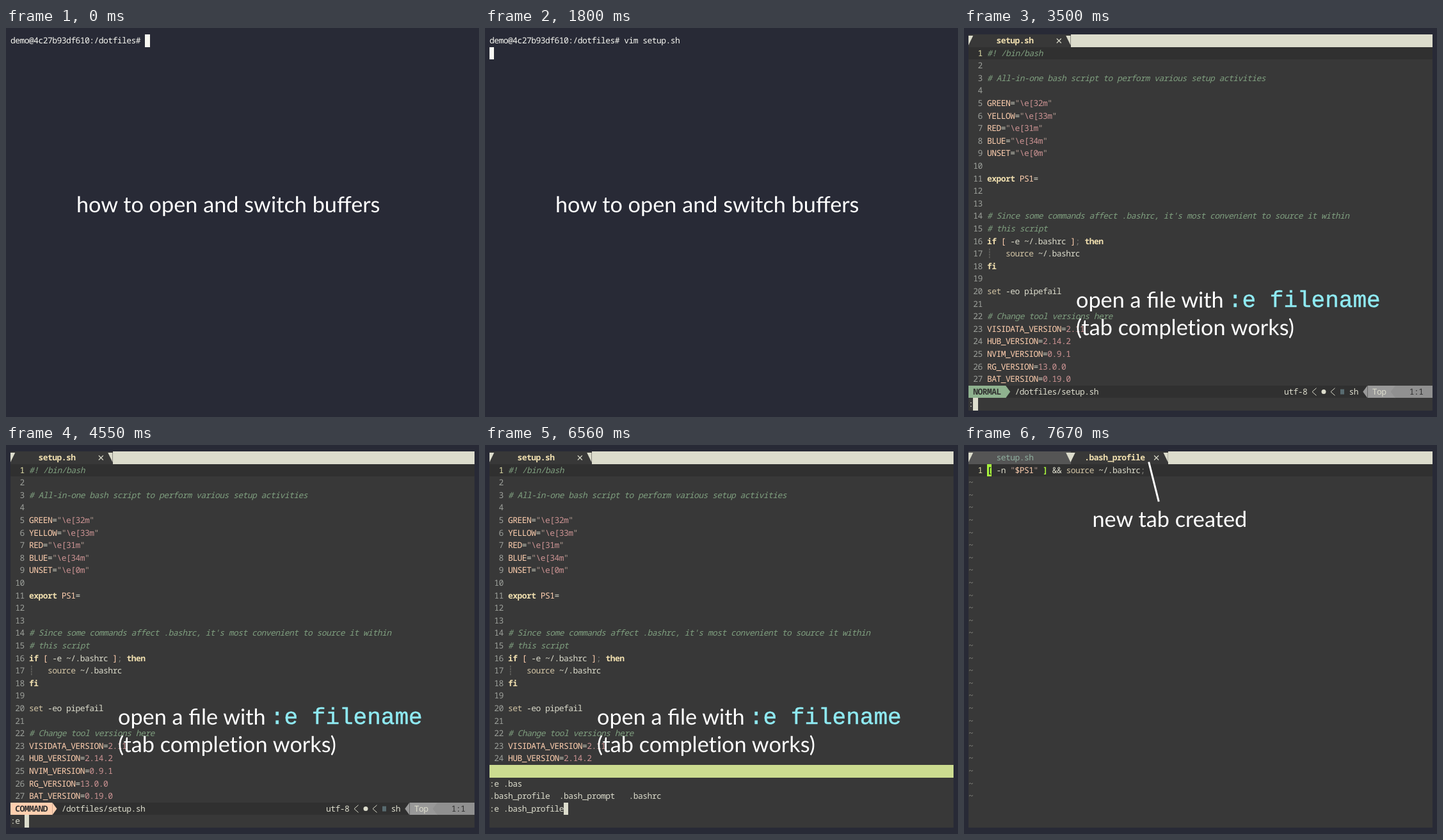
Recreate the animation shown at these times as an HTML page. Size 739 px wide and 608 px high, loop 8 s.

```html
<!DOCTYPE html>
<html lang="en">
<head>
<meta charset="utf-8">
<title>How to open and switch buffers</title>
<style>
html, body { margin: 0; width: 100%; height: 100%; overflow: hidden; background: #282a36; }
#stage {
  position: relative; width: 739px; height: 608px; overflow: hidden;
  color: #dcdccc; text-rendering: geometricPrecision;
  font: 13px/19.6px "Noto Sans Mono", "DejaVu Sans Mono", monospace;
  letter-spacing: calc(7.25px - .6em); font-variant-ligatures: none;
}
#stage div { position: absolute; white-space: pre; height: 19.6px; }
svg { position: absolute; left: 0; top: 0; letter-spacing: 0; }
svg text { font: 34.25px Lato, "Open Sans", sans-serif; fill: #fff; font-variant-ligatures: normal; }
svg .code {
  font: 36px "Liberation Mono", "Courier New", monospace;
  fill: #8feaf2; stroke: #8feaf2; stroke-width: .5;
}
.w { color: #f8f8f2; }
.n { color: #9c9f9a; }
.l { color: #e3e0a8; }
.c { color: #7f9f7f; font-style: italic; }
.v { color: #ffcfaf; }
.s { color: #cc9393; }
.q { color: #b09a90; }
.k { color: #f0dfaf; font-weight: bold; }
.f { color: #d3c5a5; }
.d { color: #80807a; }
.g { color: #a8f53c; font-weight: bold; }
.i { color: #8faf9f; }
.x { color: #303030; }
.b { color: #303030; font-weight: bold; }
</style>
</head>
<body>
<div id="stage"></div>
<script>
const LOOP = 8000, CW = 7.25, RH = 19.6;
const stage = document.getElementById("stage");
const X = col => 7 + col * CW;
const Y = row => 10 + row * RH;

// Inline markup: k{word} gives the word class k
const mark = s => s.replace(/([a-z])\{(.*?)\}/g, '<span class="$1">$2</span>');
const text = (row, col, s) => `<div style="left:${X(col)}px;top:${Y(row)}px">${mark(s)}</div>`;
const fill = (row, col, cols, color, rows = 1) =>
  `<div style="left:${X(col)}px;top:${Y(row)}px;width:${cols * CW}px;height:${rows * RH}px;background:${color}"></div>`;
const svg = s => `<svg width="739" height="608">${s}</svg>`;
const poly = (color, ...pts) => `<polygon fill="${color}" points="${pts.join(" ")}"/>`;
const caption = (x, y, s, cls = "") => `<text x="${x}" y="${y}" class="${cls}">${s}</text>`;

const PALE = "#dcdccc", GREY = "#383838", DARK = "#303030", PEACH = "#ffcfaf";

const code = [
  "c{#! /bin/bash}", "",
  "c{# All-in-one bash script to perform various setup activities}", "",
  ...["GREEN 32", "YELLOW 33", "RED 31", "BLUE 34", "UNSET 0"].map(p => {
    const [name, num] = p.split(" ");
    return `v{${name}}=q{"}s{\\e[${num}m}q{"}`;
  }), "",
  "k{export} v{PS1}=", "", "",
  "c{# Since some commands affect .bashrc, it's most convenient to source it within}",
  "c{# this script}",
  "k{if} v{[} -e ~/.bashrc v{]}d{;} k{then}",
  "d{┊}   f{source} ~/.bashrc",
  "k{fi}", "",
  "f{set} -eo pipefail", "",
  "c{# Change tool versions here}",
  ...["VISIDATA 2.11", "HUB 2.14.2", "NVIM 0.9.1", "RG 13.0.0", "BAT 0.19.0"].map(p => {
    const [name, num] = p.split(" ");
    return `v{${name}_VERSION}=s{${num}}`;
  })
];

const title = svg(caption(110, 288, "how to open and switch buffers"));
const hint = svg(caption(175, 437, "open a file with") +
  caption(413, 436, ":e filename", "code") +
  caption(175, 480, "(tab complet&zwnj;ion works)"));

function shell(typed, entered) {
  const prompt = "demo@4c27b93df610:/dotfiles# ";
  const cursor = entered ? fill(1, 0, 1, "#f8f8f2") : fill(0, prompt.length + typed.length, 1.1, "#f8f8f2");
  return text(0, 0, `w{${prompt}${typed}}`) + cursor + title;
}

const cross = col => {
  const x = X(col) + 3.6;
  return `<path d="M${x - 3.5} 16.5l7 7m0-7l-7 7" stroke="${PALE}" stroke-width="1.1"/>`;
};
const slant = (x, edge) => poly(PALE, [x, 12], [x + CW, 12], [edge, 27]);

const base = fill(0, 0, 100, GREY, 30) + fill(1, 0, 100, DARK);

function editor(lines = 27) {
  let out = base + fill(0, 22, 78, PALE) + text(0, 6, "k{setup.sh}") +
    svg(slant(7, 7) + slant(X(21), X(22)) + cross(19));
  code.slice(0, lines).forEach((line, i) => {
    const num = String(i + 1).padStart(3);
    out += text(i + 1, 0, `${i ? "n" : "l"}{${num}} ${line}`);
  });
  return out;
}

function status(mode, color) {
  const end = mode.length + 2, top = Y(28), mid = top + RH / 2, low = top + RH;
  const chevron = col => `<path d="M${X(col) + 7} ${top + 4}l-6.5 5.8l6.5 5.8" fill="none" stroke="${PALE}"/>`;
  const left = (col, c) => poly(c, [X(col + 1), top], [X(col), mid], [X(col + 1), low]);
  return fill(28, 0, 100, DARK) + fill(28, 0, end, color) +
    fill(28, 86, 6, "#999") + fill(28, 92, 8, "#909090") +
    svg(poly(color, [X(end), top], [X(end + 1), mid], [X(end), low]) +
      chevron(74) + chevron(78) + left(85, "#999") + left(91, "#909090") +
      `<circle cx="562" cy="${mid}" r="3.5" fill="${PALE}"/>` +
      `<rect x="588" y="${mid - 4}" width="6" height="8" fill="#586b70"/>`) +
    text(28, 1, `b{${mode}}`) + text(28, end + 2, "/dotfiles/setup.sh") +
    text(28, 68, "utf-8") + text(28, 82, "sh") + text(28, 87, "Top") + text(28, 95, "x{1:1}");
}

const blockOnHash = fill(1, 4, 1, "#7f9f7f") + text(1, 4, "x{#}");
const normal = status("NORMAL", "#8fb28f");
const command = status("COMMAND", PEACH);
const typing = (s, bar = command) =>
  editor() + bar + text(29, 0, s) + fill(29, s.length, 1, PALE) + hint;

function completion(cursor) {
  const line = ":e .bash_profile";
  return editor(24) + fill(25, 0, 100, "#ccdc90") + text(26, 0, ":e .bas") +
    text(27, 0, ".bash_profile") + text(27, 15, ".bash_prompt") + text(27, 30, ".bashrc") +
    text(28, 0, line) + fill(28, cursor, 1, PALE) +
    (cursor ? "" : text(28, 0, "x{:}")) + hint;
}

function newTab() {
  let out = base + fill(0, 0, 22, "#555") + fill(0, 43, 57, PALE) +
    text(0, 6, "i{setup.sh}") + text(0, 25, "k{.bash_profile}") +
    svg(slant(7, 7) + poly(PALE, [X(21), 12], [X(23), 12], [X(22), 27]) +
      slant(X(42), X(43)) + cross(40)) +
    fill(1, 4, 1, "#a8f53c") +
    text(1, 2, 'l{1} b{[} -n q{"}v{$PS1}q{"} g{]} &amp;&amp; f{source} ~/.bashrcd{;}');
  for (let row = 2; row < 28; row++) out += text(row, 0, "d{~}");
  return out + svg('<path d="M288.7 26.5L304.3 88.5" stroke="#fff" stroke-width="3"/>' +
    caption(200.5, 128, "new tab created"));
}

const steps = [
  [0, shell("")],
  ...["v", "vi", "vim", "vim ", "vim s", "vim se", "vim setup.sh "].map((s, i) => [1100 + i * 100, shell(s)]),
  [1800, shell("vim setup.sh", true)],
  [2300, fill(0, 0, 1, "#f8f8f2")],
  [2400, editor() + blockOnHash],
  [2500, editor() + normal + blockOnHash],
  [3500, typing(":", normal)],
  [3550, typing(":")],
  [4270, typing(":e")],
  [4550, typing(":e ")],
  [5700, typing(":e .")],
  [5920, typing(":e .b")],
  [6130, typing(":e .ba")],
  [6250, typing(":e .bas")],
  [6560, completion(16)],
  [7560, completion(0)],
  [7670, newTab()]
];

let shown = -1;
const start = performance.now();
function draw() {
  const t = (performance.now() - start) % LOOP;
  const now = steps.filter(s => s[0] <= t).length - 1;
  if (now !== shown) stage.innerHTML = steps[shown = now][1];
  requestAnimationFrame(draw);
}
draw();
</script>
</body>
</html>
```
